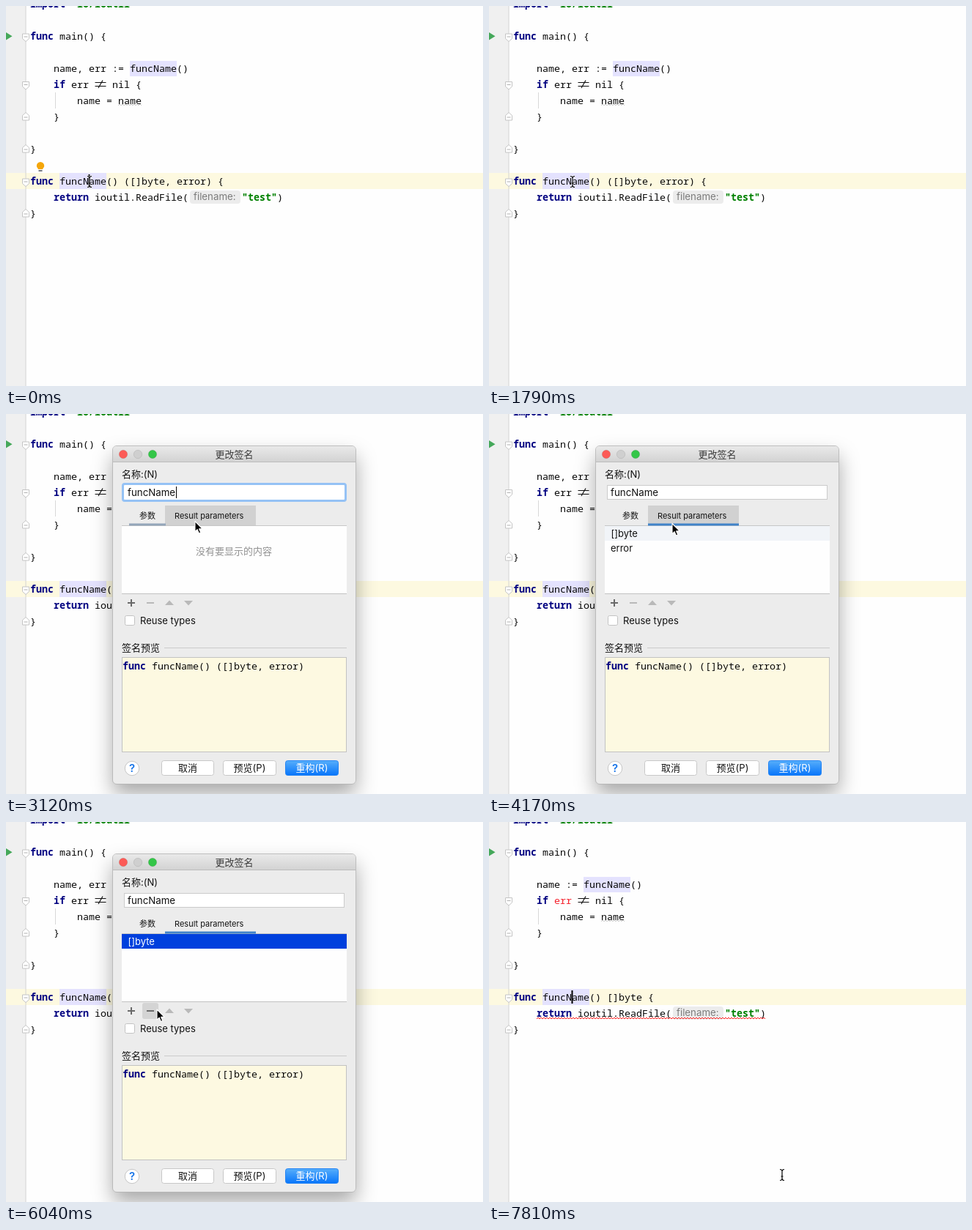
These frames come from a looping animation (651 by 519 pixels, 8 s). An HTML page:

```html
<!DOCTYPE html>
<html lang="zh">
<head>
<meta charset="utf-8">
<title>更改签名</title>
<style>
html, body { margin: 0; width: 100%; height: 100%; overflow: hidden; background: #fefefe; }
svg { display: block; width: 651px; height: 519px; }
text { white-space: pre; font: 13px Inter, "Noto Sans CJK SC", "Noto Sans CJK", sans-serif; fill: #111; }
.code { font: 13.333px "Noto Sans Mono", "DejaVu Sans Mono", monospace; fill: #080808; }
.small { font-size: 11px; }
.mid { text-anchor: middle; }
.kw { font-weight: 700; fill: #000080; }
.str { font-weight: 700; fill: #008000; }
</style>
</head>
<body>
<svg id="stage" viewBox="0 0 651 519"></svg>
<script>
const LOOP = 8000, STEP = 90;
const stage = document.getElementById('stage');

// Markup helpers
const rect = (x, y, w, h, fill, extra = '') =>
  `<rect x="${x}" y="${y}" width="${w}" height="${h}" fill="${fill}" ${extra}/>`;
const box = (x, y, w, h, fill, stroke, r = 0) =>
  rect(x + .5, y + .5, w - 1, h - 1, fill, `stroke="${stroke}" rx="${r}"`);
const text = (x, y, s, cls = '', extra = '') =>
  `<text x="${x}" y="${y}" class="${cls}" ${extra}>${s}</text>`;
const line = (d, color, width = 1, extra = '') =>
  `<path d="${d}" fill="none" stroke="${color}" stroke-width="${width}" ${extra}/>`;
const shape = (d, fill, extra = '') => `<path d="${d}" fill="${fill}" ${extra}/>`;
const group = (id, body, extra = '') => `<g id="${id}" ${extra}>${body}</g>`;
const kw = s => `<tspan class="kw">${s}</tspan>`;
const str = s => `<tspan class="str">${s}</tspan>`;

// Code rows are 22px apart, columns 8px wide
const rowY = row => 46 + 22 * row + (row > 8 ? .3 : 0);
const code = (col, row, s) => text(33 + 8 * col, rowY(row), s, 'code');
const usage = (x, y, h) => rect(x, y, 64, h, '#e4e2fe');

function wave(x0, x1, y, color) {
  let d = `M${x0} ${y + 1}`;
  for (let x = x0 + 2, up = true; x <= x1; x += 2, up = !up) d += `L${x} ${up ? y - 1 : y + 1}`;
  return line(d, color);
}

function fold(y, dir) {
  return `<g transform="translate(27 ${y}) scale(1 ${dir})">` +
    shape('M-4.5-5H4.5V1.5L0 5.5L-4.5 1.5Z', '#fff', 'stroke="#c4c4c4"') +
    line('M-2.5-1H2.5', '#b0b0b0') + '</g>';
}

function editor() {
  return rect(0, 0, 651, 519, '#fefefe') + rect(0, 0, 27, 519, '#f0f0f0') +
    rect(0, 228, 651, 22, '#fdf9e0') + rect(26.5, 0, 1, 519, '#d4d4d4') +
    shape('M0 36L8.5 41.2L0 46.5Z', '#45a85a') +
    [43, 108.5, 241].map(y => fold(y, 1)).join('') +
    [151, 195, 283].map(y => fold(y, -1)).join('') +
    rect(67, 118, 1, 22, '#d8d8d8') + usage(73, 228, 22) +
    group('before', usage(169, 75, 21) +
      code(4, 2, 'name, err := funcName()') +
      code(5, 9, 'funcName() ([]byte, error) {')) +
    group('after', usage(129, 75, 21) +
      code(4, 2, 'name := funcName()') + code(5, 9, 'funcName() []byte {')) +
    code(0, -2, kw('import') + ' ' + str('"io/ioutil"')) +
    code(0, 0, kw('func') + ' main() {') +
    code(4, 3, kw('if') + ' <tspan id="err">err</tspan>    nil {') +
    line('M121.5 104.5H136.5M121.5 109.5H136.5M132 101.5L126 112', '#111', 1.2) +
    code(8, 4, 'name = name') + wave(153, 185, 135, '#cfcfcf') +
    code(4, 5, '}') + code(0, 7, '}') + code(0, 9, kw('func')) +
    code(4, 10, kw('return') + ' ioutil.ReadFile(') +
    rect(251, 252, 69, 18, '#ececec', 'rx="4"') +
    text(256, 265, 'filename:', '', 'style="font-size:13.3px;fill:#7c7c7c"') +
    text(322, rowY(10), str('"test"') + ')', 'code') + code(0, 11, '}') +
    group('errors', wave(65, 378, 268, '#f22')) +
    group('bulb', shape('M41.8 218.3a5.2 5.2 0 1 1 10.4 0c0 2.2-1.6 3-2.2 4.7h-6c-.6-1.700-2.200-2.500-2.200-4.700Z', '#f4a60a') +
      rect(44.500, 224, 5, 2, '#777')) +
    group('caret', rect(112.500, 230, 2, 18, '#000'));
}

function popup() {
  const items = ['1. 重命名...', '2. 更改签名...', '3. 提取方法...', '4. 提取接口...', '5. 内联...', '6. 移动...', '7. 安全删除...'];
  return rect(113, 252, 173, 174, '#fff', 'stroke="#bdbdbd" stroke-width=".6" filter="url(#near)"') +
    rect(113, 252, 173, 22, '#e6e6e6') + text(199.5, 268, '重构', 'mid') +
    group('pick', rect(113, 274, 173, 20, '#0040dd')) +
    line('M113 319.500H286', '#d5d5d5') +
    items.map((s, i) => text(124, 289 + 20 * i + (i > 1 ? 9 : 0), s, 'item')).join('');
}

const ring = (x, y, w, h) => rect(x + 1.5, y + 1.5, w - 3, h - 3, '#fff', 'rx="2.500" stroke="#95c2f5" stroke-width="3"');

function button(x, w, label, main) {
  return box(x, 473, w, 21, main ? 'url(#blue)' : '#fff', main ? '#2484f4' : '#c8c8c8', 3) +
    text(x + w / 2, 488, label, 'mid', main ? 'style="fill:#fff"' : '');
}

function table() {
  return rect(158, 153, 307, 92, '#fefefe') +
    group('empty', text(311, 192, '没有要显示的内容', 'mid', 'style="fill:#929292"')) +
    group('results', rect(158, 153, 307, 20, '#f1f4f8', 'id="row1"') +
      rect(158, 173, 307, 21, '#fefefe', 'id="row2"') +
      text(166.5, 168, '[]byte', '', 'id="type1"') + text(166, 188, 'error', '', 'id="type2"')) +
    group('cell', rect(158, 173, 307, 46, '#ececec') +
      text(162, 186, 'Name:', 'small') + text(323, 186, '类型:', 'small') +
      box(165, 194, 147, 20, '#fff', '#cbcbcb') + ring(323, 191, 138, 26) +
      text(331, 209, 'error') + rect(362, 196, 1, 16, '#000'));
}

function toolbar() {
  return group('minusHover', rect(186, 247, 22, 22, '#d4d4d4', 'rx="3"')) +
    line('M166 258H176M171 253V263', '#6a6a6a', 2) +
    line('M192 258H202', '#b9b9b9', 2, 'id="minus"') +
    shape('M217 261H229L223 254.500Z', '#b9b9b9', 'id="up"') +
    shape('M243 255H255L249 261.500Z', '#b9b9b9');
}

function dialog() {
  const lights = ['#fc5b57', '#cfcfcf', '#34c648'];
  return rect(146, 44, 331.500, 461, '#ececec', 'rx="5" filter="url(#far)"') +
    rect(145.500, 43.500, 332, 462, '#ececec', 'rx="5.500" stroke="#a9a9a9" stroke-width=".7"') +
    shape('M146 66V49a5 5 0 0 1 5-5H472a5 5 0 0 1 5 5V66Z', 'url(#bar)') +
    line('M146 65.500H477', '#bcbcbc') +
    lights.map((c, i) => `<circle cx="${160 + 20 * i}" cy="55" r="5.700" fill="${c}" stroke="#000" stroke-opacity=".13" stroke-width=".7"/>`).join('') +
    text(311.500, 60, '更改签名', 'mid', 'style="fill:#3b3b3b"') +
    text(158, 87, '名称:(N)') +
    box(161, 97, 301, 20, '#fff', '#cbcbcb') + group('focus', ring(158, 94, 307, 26)) +
    text(166, 112, 'funcName', '', 'style="font-size:13.300px"') +
    group('nameCaret', rect(232, 99, 1, 16, '#000')) +
    group('tabHover', rect(217, 125, 124, 27, '#d1d1d1')) +
    line('M158 152.500H465', '#c6c6c6') +
    group('tab1', rect(168, 149.500, 50, 3, '#94a6ba')) +
    group('tab2', rect(217, 149.500, 124, 3, '#4083c9')) +
    text(193, 143, '参数', 'small mid') + text(230, 143, 'Result parameters', 'small') +
    table() + line('M158 245.500H465', '#c2c2c2') + toolbar() +
    box(162, 275, 14, 14, '#fff', '#c3c3c3', 2) + text(183, 287, 'Reuse types') +
    text(158, 324, '签名预览') + line('M216 319.500H465', '#cbcbcb') +
    box(158, 332, 307, 130, '#fdf9e1', '#c2c2c2') +
    text(159, 349, kw('func') + ' funcName() <tspan id="preview"></tspan>', 'code', 'id="signature"') +
    '<circle cx="172" cy="484" r="9.700" fill="#fff" stroke="#c6c6c6"/>' +
    text(172, 489, '?', 'mid', 'style="fill:#1a76e8;font-size:15px;font-weight:600"') +
    button(212, 72, '取消') + button(296, 73, '预览(P)') + button(381, 73, '重构(R)', true);
}

const gradient = (id, a, b) =>
  `<linearGradient id="${id}" x2="0" y2="1"><stop stop-color="${a}"/><stop offset="1" stop-color="${b}"/></linearGradient>`;
const shadow = (id, dy, blur, alpha) =>
  `<filter id="${id}" x="-30%" y="-30%" width="160%" height="160%"><feDropShadow dx="0" dy="${dy}" stdDeviation="${blur}" flood-opacity="${alpha}"/></filter>`;

const beam = 'M-3-7.500Q0-7.500 0-5Q0-7.500 3-7.500M-3 7.500Q0 7.500 0 5Q0 7.500 3 7.500M0-5V5M-1.500 2H1.500';
stage.innerHTML = '<defs>' + gradient('bar', '#e9e9e9', '#d2d2d2') + gradient('blue', '#56aefb', '#0875fa') +
  shadow('near', 2, 2.500, .25) + shadow('far', 14, 14, .34) + '</defs>' +
  editor() + group('popup', popup()) + group('dialog', dialog()) +
  group('beam', line(beam, '#fff', 2.500, 'opacity=".7"') + line(beam, '#000', 1.200)) +
  group('arrow', shape('M0 0V14.200L3.200 11.200L5.400 16.500L7.800 15.500L5.600 10.400H10.200Z', '#000', 'stroke="#fff" stroke-width="1.100" stroke-linejoin="round"'));

const el = {};
stage.querySelectorAll('[id]').forEach(node => el[node.id] = node);
const items = stage.querySelectorAll('.item');
const show = (id, on) => el[id].setAttribute('display', on ? 'inline' : 'none');
const tint = (id, color) => el[id].style.fill = color;

// Pointer moves: start time, number of steps, points passed
const moves = [
  [2150, 10, [[113.5, 238.5], [190, 256], [262, 140]]],
  [3120, 10, [[262, 140], [190, 256], [250, 149.5]]],
  [4350, 4, [[250, 149.5], [195.5, 178.5]]],
  [5420, 5, [[195.5, 178.5], [206, 256]]],
  [6300, 10, [[206, 256], [399.5, 480.5]]]
];

function pointer(t) {
  let pos = moves[0][2][0];
  for (const [start, steps, pts] of moves) {
    if (t < start) break;
    const p = Math.min(1, (Math.floor((t - start) / STEP) + 1) / steps);
    const u = p * p * (3 - 2 * p) * (pts.length - 1);
    const i = Math.min(pts.length - 2, Math.floor(u));
    pos = pts[i].map((v, k) => v + (pts[i + 1][k] - v) * (u - i));
  }
  return pos;
}

function draw(t) {
  const within = (a, b) => t >= a && t < b;
  const [x, y] = pointer(t);
  const done = t >= 7540, open = within(1880, 7450), results = t >= 4170;
  const removed = t >= 5950, picked = within(4890, 5060), flagged = t >= 7810;

  show('before', !done);
  show('after', done);
  show('errors', flagged);
  tint('err', flagged ? '#f5222d' : '');
  show('bulb', t < 710);
  show('caret', t < 170 || done);

  show('popup', within(710, 1790));
  const choice = t < 1430 ? 0 : 1;
  el.pick.setAttribute('transform', `translate(0 ${20 * choice})`);
  items.forEach((node, i) => node.style.fill = i === choice ? '#fff' : '');

  show('dialog', open);
  show('focus', within(1970, 4170));
  show('nameCaret', within(1970, 2420) || within(2950, 3480) || within(3900, 4170));
  show('tabHover', x > 217 && x < 341 && y > 125 && y < 152);
  show('tab1', !results);
  show('tab2', results);
  show('empty', !results);
  show('results', results);
  show('cell', within(5060, 5950));
  show('type2', !removed);
  tint('row1', removed ? '#0040dd' : '#f1f4f8');
  tint('type1', removed ? '#fff' : '');
  tint('row2', picked ? '#0040dd' : '#fefefe');
  tint('type2', picked ? '#fff' : '');
  show('minusHover', t >= 5420 && x > 186 && x < 208 && y > 247 && y < 269);
  el.minus.setAttribute('stroke', t >= 4890 ? '#6a6a6a' : '#b9b9b9');
  tint('up', within(4890, 5950) ? '#6a6a6a' : '#b9b9b9');
  show('signature', t >= 1970);
  el.preview.textContent = t < 6120 ? '([]byte, error)' : '[]byte';

  show('arrow', open);
  show('beam', !open);
  el.arrow.setAttribute('transform', `translate(${x} ${y})`);
  el.beam.setAttribute('transform', `translate(${x + .5} ${y + 1.5})`);
}

const begin = performance.now();
function tick() {
  draw((performance.now() - begin) % LOOP);
  requestAnimationFrame(tick);
}
tick();
</script>
</body>
</html>
```
